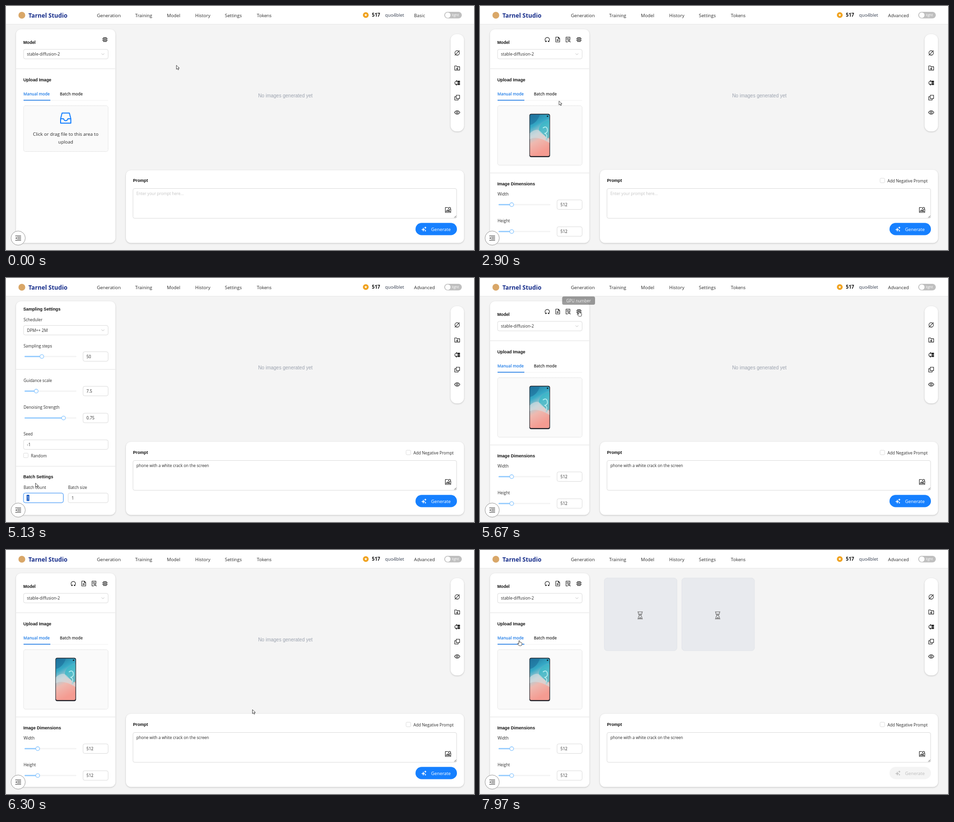
An HTML page for the animation above (8000 ms loop, 960 by 502 pixels).

```html
<!DOCTYPE html>
<html lang="en">
<head>
<meta charset="utf-8">
<title>Image generation studio</title>
<style>
html, body { margin: 0; width: 100%; height: 100%; overflow: hidden; background: #f4f4f4; }
svg { display: block; width: 100vw; height: 100vh; }
text { font-family: "Open Sans", "Noto Sans", sans-serif; white-space: pre; }
.arial { font-family: "Liberation Sans", Arial, sans-serif; }
.card { filter: drop-shadow(0 1px 1.6px rgba(0,0,0,.2)); }
.icon { fill: none; stroke: #222; stroke-width: 1.1; stroke-linejoin: round; stroke-linecap: round; }
</style>
</head>
<body>
<svg id="stage" viewBox="0 0 960 502" xmlns="http://www.w3.org/2000/svg"></svg>
<script>
const LOOP = 8000;
const PROMPT = 'phone with a white crack on the screen';
const INK = '#2b2b2b', BLUE = '#1680ff', EDGE = '#dcdcdc';

// Markup helpers
const rect = (x, y, w, h, r, fill, stroke = 'none', more = '') =>
  `<rect x="${x}" y="${y}" width="${w}" height="${h}" rx="${r}" fill="${fill}" stroke="${stroke}" ${more}/>`;
const text = (x, y, s, size = 8.3, fill = INK, more = '') =>
  `<text x="${x}" y="${y}" font-size="${size}" fill="${fill}" ${more}>${s}</text>`;
const heading = (x, y, s) => text(x, y, s, 8.75, '#111', 'class="arial" font-weight="700"');
const icon = (x, y, body, more = '') =>
  `<g class="icon" transform="translate(${x} ${y})" ${more}>${body}</g>`;
const path = (d, more = '') => `<path d="${d}" ${more}/>`;
const group = (id, body, more = '') => `<g id="${id}" ${more}>${body}</g>`;
const rule = y => rect(20.5, y - .5, 204, 1, 0, '#e2e2e2');
const field = (x, y, w, s, id = '') =>
  rect(x, y - 9.8, w, 19.6, 3.5, '#fff', EDGE, id && `id="${id}Box"`) +
  text(x + 7, y + 3.3, s, 8.3, INK, id && `id="${id}"`);
const select = (y, s) => field(36, y, 173.5, s) +
  path(`M196 ${y - 1.5}l2.8 3 2.8-3`, 'fill="none" stroke="#bbb" stroke-width=".9"');
const slider = (y, label, knob, value) =>
  text(36, y - 18.8, label) +
  rect(38, y - 1.2, 106.5, 2.4, 1.2, '#f3f3f3') +
  rect(38, y - 1.2, knob - 38, 2.4, 1.2, '#91caff') +
  `<circle cx="${knob}" cy="${y}" r="3.9" fill="#fff" stroke="#91caff" stroke-width="1.4"/>` +
  field(158, y, 51.5, value);
const checkbox = (x, y, label) =>
  rect(x, y - 4.7, 9.4, 9.4, 2, '#fff', EDGE) + text(x + 15, y + 3.7, label);

function header() {
  const nav = [[186.5, 'Generation'], [265, 'Training'], [330, 'Model'],
    [388, 'History'], [449, 'Settings'], [514.5, 'Tokens']];
  const star = Array.from({ length: 10 }, (_, i) => {
    const a = -Math.PI / 2 + i * Math.PI / 5, r = i % 2 ? 1.4 : 3.2;
    return `${738 + r * Math.cos(a)},${18.6 + r * Math.sin(a)}`;
  }).join(' ');
  return rect(0, 0, 960, 37, 0, '#fff') + rect(0, 37, 960, 1, 0, '#e6e6e6') +
    '<circle cx="32.5" cy="19" r="7" fill="#d9a768"/>' +
    text(46, 23.8, 'Tarnel Studio', 12.2, '#152c8a', 'font-weight="700"') +
    nav.map(([x, s]) => text(x, 22.5, s, 9.35)).join('') +
    `<circle cx="738" cy="18.6" r="5.9" fill="#f0a11c"/><polygon points="${star}" fill="#fff"/>` +
    text(750.5, 22.3, '517', 9.9, '#111', 'font-weight="700"') +
    text(777.5, 22.3, 'quo4blet', 9.35, '#333c4d') +
    text(837, 22.5, 'Basic', 9.4, INK, 'id="level"') +
    rect(899, 12, 36, 13.6, 6.8, '#bfbfbf') +
    '<circle cx="906.3" cy="18.8" r="5.6" fill="#fff"/>' +
    text(914.5, 21.3, 'light', 7.2, '#fff');
}

function toolbar() {
  return rect(912, 58, 27.5, 200, 12, '#fff', 'none', 'class="card"') +
    icon(925.5, 96.5, '<circle r="4.6"/>' + path('M-4.6 4.6L4.6-4.6')) +
    icon(925.5, 127.5, path('M-5-4.2h3.6l1.3 1.6h5.2v7h-10zM0-1v3.6M-1.6 1.2L0 2.8 1.6 1.2')) +
    icon(925.5, 158, path('M-.6-3.4a3.6 3.6 0 1 0 .2 7M-1.7-5l1.6 1.6-1.6 1.6M-2 2.2l1.7 1.4L-2 5') +
      path('M1.2-3.8h4v3h-4zM1.2 1h1.4v3h-1.4zM3.8 1h1.4v3h-1.4z', 'fill="#222"')) +
    icon(925.5, 188.5, path('M-2-5h7v7h-7zM-2-2h-3v7h7v-3')) +
    icon(925.5, 219, path('M-5.6 0Q-3-3.8 0-3.8T5.6 0Q3 3.8 0 3.8T-5.6 0z') + '<circle r="1.8"/>');
}

function phone() {
  return rect(36, 205, 173.5, 122.5, 4, '#fafafa', EDGE, 'stroke-dasharray="2 1"') +
    rect(101.3, 221.8, 42.4, 89.2, 4, '#20242c') +
    rect(102.4, 223.2, 40, 85.6, 3, 'url(#screen)') +
    '<g clip-path="url(#glass)">' +
    path('M102 223h21q-6 18-21 22z', 'fill="#1c6f9b" opacity=".6"') +
    path('M143 235q-14 2-20 12t4 16 8 12 8-6z', 'fill="#35b9c9" opacity=".75"') +
    path('M102 262q14-13 23-3t18 15v8q-26-16-41-8z', 'fill="#d5dde0" opacity=".65"') +
    path('M129 251q7-5 9 2t-5 9q6 3 3 9', 'fill="none" stroke="#b8eff1" stroke-width="1.6"') +
    '</g><circle cx="138.5" cy="226.8" r="1.5" fill="#15202c"/>';
}

function emptyDrop() {
  return rect(36, 205, 173.5, 94.5, 4, '#fafafa', EDGE, 'stroke-dasharray="2 1"') +
    path('M112 232l3-11.8h15l3 11.8v9h-21zM112 232h6.2q1 4 4.3 4t4.3-4h6.2',
      `fill="none" stroke="${BLUE}" stroke-width="2" stroke-linejoin="round"`) +
    text(122.5, 267.3, 'Click or drag file to this area to', 9.5, INK, 'text-anchor="middle"') +
    text(122.5, 282.8, 'upload', 9.5, INK, 'text-anchor="middle"');
}

function options() {
  return rule(343.5) + heading(35.5, 368.5, 'Image Dimensions') +
    slider(408.7, 'Width', 65, '512') + slider(464, 'Height', 65, '512') +
    rule(489.3) + heading(35.5, 514, 'Sampling Settings') +
    text(36, 536.2, 'Scheduler') + select(554.4, 'DPM++ 2M') +
    slider(608.5, 'Sampling steps', 73.5, '50') + rule(635) +
    slider(679.7, 'Guidance scale', 62, '7.5') +
    slider(735, 'Denoising Strength', 118, '0.75') +
    text(36, 771.3, 'Seed') + field(36, 789.8, 173.5, '-1') +
    checkbox(36, 812, 'Random') + rule(834.3) +
    heading(35.5, 859, 'Batch Settings') +
    text(36, 880.8, 'Batch count') + text(127.5, 880.8, 'Batch size') +
    rect(34.8, 888.4, 83.8, 22, 4.5, '#dbeaff', 'none', 'id="countGlow"') +
    field(36, 899.4, 81.5, '1', 'count') +
    group('picked', rect(42.3, 893, 5.6, 12.8, 0, '#1f5fc4') + text(43, 902.7, '1', 8.3, '#fff')) +
    field(127.5, 899.4, 82, '1');
}

function sidebar() {
  const chip = '<rect x="-3.4" y="-3.4" width="6.8" height="6.8" rx="1"/><rect x="-1.3" y="-1.3" width="2.6" height="2.6"/>' +
    path('M-1.8-5v1.4M1.8-5v1.4M-1.8 3.6V5M1.8 3.6V5M-5-1.8h1.4M-5 1.8h1.4M3.6-1.8H5M3.6 1.8H5');
  const sheet = 'M-4-5h5.2L4-2.2V5h-8zM1-5v3h3';
  return rect(20.5, 48, 204, 439.5, 10, '#fff', 'none', 'class="card"') +
    '<g clip-path="url(#side)">' + group('scroll',
      heading(35.5, 77.5, 'Model') + icon(203, 69, chip) +
      group('tools',
        icon(138, 69, path('M-2.2 4.3a4.6 4.6 0 1 1 4.4 0M-3.8 4.4h1.9v-1.9M3.8 4.4H1.9v-1.9')) +
        icon(159.5, 69, path(sheet + 'M-2 1.2h4M0-.8v4')) +
        icon(180.5, 69, path('M-.5 5H-4V-5h8v5M-2-2.5h4M-2-.3h2') + '<circle cx="1.8" cy="2.2" r="1.8"/>' + path('M3.2 3.6L4.8 5.2'))) +
      select(99, 'stable-diffusion-2') + rule(129) +
      heading(35.5, 154.5, 'Upload Image') +
      text(35.7, 184.2, 'Manual mode', 8.15, '#1677e6', 'font-weight="600"') +
      text(110.5, 184.2, 'Batch mode', 8.15, INK, 'font-weight="600"') +
      rect(36, 193.8, 173.5, .8, 0, '#ededed') + rect(36, 193, 55, 1.5, 0, '#1677e6') +
      group('empty', emptyDrop()) + group('photo', phone()) + group('options', options())) +
    '</g>' +
    '<circle cx="25" cy="477.5" r="14.6" fill="#fff" stroke="#8f8f8f" stroke-width=".9"/>' +
    icon(25, 477.5, path('M-5.5-4.5h11M-1.5-1.5h7M-1.5 1.5h7M-5.5 4.5h11') + path('M-5.6 0l2.6-1.8v3.6z', 'fill="#222" stroke="none"'), 'stroke-width=".9"');
}

function promptCard() {
  const spark = (x, y, r) => path(`M${x} ${y - r}Q${x} ${y} ${x + r} ${y}Q${x} ${y} ${x} ${y + r}Q${x} ${y} ${x - r} ${y}Q${x} ${y} ${x} ${y - r}z`, 'stroke-width=".7" stroke="currentColor"');
  return rect(246, 338, 693.5, 149.5, 10, '#fff', 'none', 'id="card" class="card"') +
    heading(260.5, 361.8, 'Prompt') +
    group('negative', checkbox(820.7, 359, 'Add Negative Prompt')) +
    rect(259.5, 374.5, 666, 63.5, 4.5, '#dcebfb', 'none', 'id="areaGlow"') +
    rect(260.5, 375.5, 664, 61.3, 3.5, '#fff', EDGE, 'id="area"') +
    text(267.5, 389.2, '', 8.2, INK, 'id="prompt"') +
    path('M919.5 435.5l4-4M921.8 435.5l1.7-1.7', 'stroke="#555" stroke-width=".9"') +
    icon(906.8, 419.5, path('M-.5-5h-5v10.3h11V1.2M-4 3l2.6-3 2 2 1.2-1L4 3z') +
      '<circle cx="3" cy="-3" r="2.2"/>' + path('M4.7-1.3L6.2.2')) +
    rect(840, 446.3, 85, 25.2, 12.6, BLUE, 'none', 'id="button"') +
    group('caption', spark(856, 460, 3.6) + spark(860.2, 456, 1.9) + spark(860.2, 462.4, 1.3) +
      text(872, 462.8, 'Generate', 9.3, 'currentColor'), 'fill="currentColor"');
}

const waiting = x => rect(x, 57.7, 149, 149.4, 6, '#e8eaee', '#dadee4', 'stroke-dasharray="2 1"') +
  icon(x + 73.5, 134.5, path('M-5-7.2H5M-5 7.2H5M-3.8-7v2.4Q-3.8-2-.9 0-3.8 2-3.8 4.6V7M3.8-7v2.4Q3.8-2 .9 0 3.8 2 3.8 4.6V7', 'stroke="#666"') +
    path('M-2.7-3.6h5.4L0-.3zM-3 6.6Q-2 3.6 0 3.4T3 6.6z', 'fill="#8a8a8a" stroke="none"'));

function dialog() {
  return rect(0, 0, 960, 502, 0, '#000', 'none', 'opacity=".45"') +
    rect(315, 63, 317, 102, 5, '#fff', 'none', 'class="card"') +
    text(329.5, 90, 'Input the GPU number you want', 11.8, '#262626', 'font-weight="500"') +
    field(329.5, 116.5, 55, '', 'gpu') +
    rect(538, 133.7, 43.5, 19.6, 3.5, '#fff', EDGE) + text(559.7, 146.6, 'Cancel', 8.3, INK, 'text-anchor="middle"') +
    rect(586.5, 133.5, 30.7, 20, 3.5, BLUE) + text(601.8, 146.6, 'OK', 8.3, '#fff', 'text-anchor="middle"');
}

const stage = document.getElementById('stage');
stage.innerHTML =
  '<defs><linearGradient id="screen" x1="0" y1="0" x2=".25" y2="1">' +
  [[0, '#24769d'], [.3, '#35a9c6'], [.52, '#b7ccd2'], [.68, '#eeb9b0'], [1, '#f59b91']]
    .map(([o, c]) => `<stop offset="${o}" stop-color="${c}"/>`).join('') +
  '</linearGradient>' +
  `<clipPath id="side">${rect(20.5, 48, 204, 439.5, 10, '#fff')}</clipPath>` +
  `<clipPath id="glass">${rect(102.4, 223.2, 40, 85.6, 3, '#fff')}</clipPath></defs>` +
  rect(0, 0, 960, 502, 0, '#f4f4f4') + header() + toolbar() + sidebar() +
  text(573, 188.3, 'No images generated yet', 10, '#9ca3af', 'id="none" class="arial" text-anchor="middle"') +
  group('results', waiting(255) + waiting(414)) + promptCard() +
  group('tip', rect(168.5, 38, 67.5, 17, 3.5, '#222') +
    text(202.2, 49.5, 'GPU number', 8.3, '#fff', 'text-anchor="middle"')) +
  group('modal', dialog()) +
  group('arrow', path('M0 0v8.2l2-1.8 1.4 3 1.5-.7L3.5 5.8h2.7z', 'fill="#fff" stroke="#222" stroke-width=".8" stroke-linejoin="round"')) +
  group('hand', path('M-1 .8Q0-.8 1 .8V4q1-.7 1.7.2 1-.5 1.6.4 1.2-.3 1.2 1V8q0 3-2.6 3H.8Q-1 11-3.8 6.6q.8-1.4 2.8.6z', 'fill="#fff" stroke="#222" stroke-width=".8" stroke-linejoin="round"'));

const el = {};
stage.querySelectorAll('[id]').forEach(n => el[n.id] = n);

const clamp = v => Math.max(0, Math.min(1, v));
const ramp = (t, a, b) => clamp((t - a) / (b - a));
const easeOut = p => 1 - (1 - p) ** 3;
const smooth = p => p * p * (3 - 2 * p);
const show = (node, on) => node.setAttribute('display', on ? 'inline' : 'none');
const move = (node, x, y) => node.setAttribute('transform', `translate(${x} ${y})`);

// Pointer stops: time, x, y
const stops = [[60, 349.5, 122], [520, 845, 18], [1200, 845, 18], [1440, 850, 36],
  [1560, 850, 36], [2100, 122, 248], [2450, 122, 248], [2900, 162, 195.5],
  [3200, 500, 400], [3850, 500, 400], [4090, 123, 366], [4350, 123, 366],
  [4720, 45, 450], [4960, 45, 450], [5130, 60.5, 422], [5300, 60.5, 422],
  [5640, 203, 68], [5740, 203, 68], [5830, 226, 105], [5980, 358, 115],
  [6040, 358, 115], [6150, 600, 142], [6190, 600, 142], [6300, 505.5, 328.5],
  [6700, 880, 460], [6850, 880, 460], [7380, 516, 428], [7900, 80.5, 186]];

function pointer(t) {
  const i = stops.findIndex(s => s[0] > t);
  if (i === 0) return stops[0].slice(1);
  if (i < 0) return stops[stops.length - 1].slice(1);
  const [a, x, y] = stops[i - 1], [b, u, v] = stops[i], p = smooth(ramp(t, a, b));
  return [x + (u - x) * p, y + (v - y) * p];
}

function draw(t) {
  const advanced = t >= 1520, uploaded = t >= 2500, started = t >= 6800;
  const typing = t >= 3250 && t < 4960, counting = t >= 4960 && t < 5740;

  el.level.textContent = advanced ? 'Advanced' : 'Basic';
  show(el.tools, advanced);
  show(el.options, advanced);
  show(el.negative, advanced);
  show(el.empty, !uploaded);
  show(el.photo, uploaded);
  move(el.options, 0, uploaded ? 0 : -28);
  el.card.setAttribute('y', advanced ? 337 : 338);
  el.card.setAttribute('height', advanced ? 150.5 : 149.5);

  const down = easeOut(ramp(t, 4000, 4180)), up = smooth(ramp(t, 5330, 5600));
  move(el.scroll, 0, -447 * (down - up));

  const typed = PROMPT.slice(0, Math.floor(PROMPT.length * ramp(t, 3300, 3870)));
  el.prompt.textContent = typed || 'Enter your prompt here...';
  el.prompt.setAttribute('fill', typed ? INK : '#c4c4c4');
  el.area.setAttribute('stroke', typing ? '#4a9eea' : EDGE);
  show(el.areaGlow, typing);

  el.countBox.setAttribute('stroke', counting ? '#3f96f5' : EDGE);
  show(el.countGlow, counting);
  show(el.picked, counting && t < 5240);
  el.count.textContent = t < 5240 ? '1' : '2';

  const hover = ramp(t, 5640, 5700) * (1 - ramp(t, 5740, 5835));
  el.tip.setAttribute('opacity', hover * .85);
  const open = ramp(t, 5735, 5820) * (1 - ramp(t, 6190, 6270));
  el.modal.setAttribute('opacity', open);
  show(el.modal, open > 0);
  el.gpu.textContent = t >= 6060 ? '1' : '';

  show(el.none, !started);
  show(el.results, started);
  el.button.setAttribute('fill', started ? '#f4f4f4' : BLUE);
  el.caption.setAttribute('color', started ? '#bdbdbd' : '#fff');

  const [x, y] = pointer(t);
  const linked = x > 840 && (y < 30 || y > 446) || x < 92 && y > 172 && y < 195 ||
    Math.abs(x - 203) < 5 && y < 75 || x > 586 && x < 617 && y > 133 && y < 153 && open > .5;
  show(el.arrow, !linked);
  show(el.hand, linked);
  move(linked ? el.hand : el.arrow, x, y);
}

const start = performance.now();
function tick() {
  draw((performance.now() - start) % LOOP);
  requestAnimationFrame(tick);
}
tick();
</script>
</body>
</html>
```
